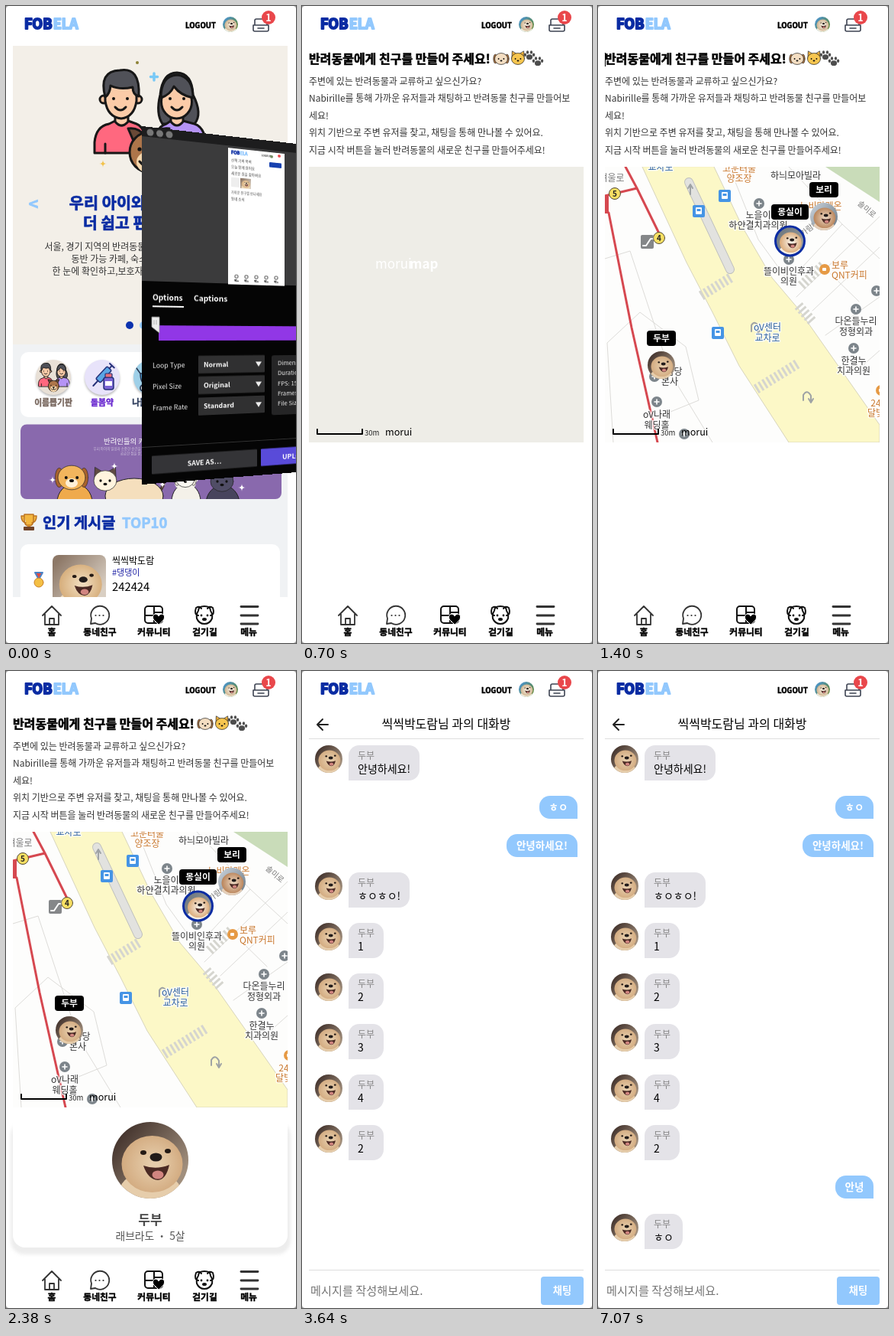
Recreate the animation shown at these times as an HTML page with a canvas. Size 380 by 832 pixels, loop 8120 ms.

```html
<!DOCTYPE html>
<html lang="ko">
<head>
<meta charset="utf-8">
<style>
html, body { margin: 0; width: 100%; height: 100%; overflow: hidden; background: #fff; }
canvas { display: block; }
</style>
</head>
<body>
<canvas id="stage" width="380" height="832"></canvas>
<script>
const LOOP = 8120, STEP = 70;
const NAVY = "#0a2ca3", SKY = "#92c8fd", INK = "#111";
const FONT = '"Noto Sans CJK KR", "Noto Sans KR", "Noto Sans CJK JP", "Noto Sans", sans-serif';
const stage = document.getElementById("stage").getContext("2d");
let g = stage;

function paint(path, fill, stroke, width = 1) {
  if (fill) { g.fillStyle = fill; g.fill(path); }
  if (stroke) { g.strokeStyle = stroke; g.lineWidth = width; g.stroke(path); }
}
const shape = (d, fill, stroke, width) => paint(new Path2D(d), fill, stroke, width);
function box(x, y, w, h, r, fill, stroke, width) {
  const p = new Path2D();
  p.roundRect(x, y, w, h, r);
  paint(p, fill, stroke, width);
}
function oval(x, y, rx, ry, fill, stroke, width) {
  const p = new Path2D();
  p.ellipse(x, y, rx, ry, 0, 0, 7);
  paint(p, fill, stroke, width);
}
const dot = (x, y, r, fill, stroke, width) => oval(x, y, r, r, fill, stroke, width);
function text(s, x, y, size, color = "#000", weight = 400, align = "left", heavy = 0) {
  g.font = `${weight} ${size}px ${FONT}`;
  g.textAlign = align;
  g.fillStyle = g.strokeStyle = color;
  if (heavy) { g.lineWidth = heavy; g.strokeText(s, x, y); }
  g.fillText(s, x, y);
}
const display = (s, x, y, size, color, align) => text(s, x, y, size, color, 700, align, size * .035);
function scoped(draw) { g.save(); draw(); g.restore(); }
function clipped(x, y, w, h, r, draw) {
  scoped(() => {
    g.beginPath();
    g.roundRect(x, y, w, h, r);
    g.clip();
    draw();
  });
}
function prerender(w, h, draw) {
  const sheet = new OffscreenCanvas(w, h);
  g = sheet.getContext("2d");
  draw();
  g = stage;
  return sheet;
}
function sparkle(x, y, r, color) {
  shape(`M${x} ${y - r}Q${x} ${y} ${x + r} ${y}Q${x} ${y} ${x} ${y + r}Q${x} ${y} ${x - r} ${y}Q${x} ${y} ${x} ${y - r}`, color);
}
function paw(x, y, r, color) {
  oval(x, y + r * 0.4, r * 0.6, r * 0.5, color);
  for (let i = 0; i < 4; i++) {
    const a = Math.PI * (1.08 + i * 0.28);
    oval(x + Math.cos(a) * r * 0.85, y + Math.sin(a) * r * 0.75 + r * 0.15, r * 0.24, r * 0.32, color);
  }
}
function pawPair(x, y) { paw(x - 5, y - 4, 6.8, "#4d4d4d"); paw(x + 6, y + 4, 6.8, "#4d4d4d"); }

// A simple animal head; pointed ears make it a cat.
function face(x, y, r, fur, ear, cat) {
  for (const side of [-1, 1]) {
    if (cat) shape(`M${x + side * r * .9} ${y - r * 1.15}L${x + side * r * .95} ${y}L${x + side * r * .15} ${y - r * .7}Z`, ear, "#222", .7);
    else oval(x + side * r * .9, y, r * .3, r * .7, ear, "#222", .6);
  }
  oval(x, y, r, r * .88, fur, "#222", .7);
  dot(x - r * .4, y, r * .11, INK);
  dot(x + r * .4, y, r * .11, INK);
  oval(x, y + r * .3, r * .17, r * .12, INK);
}

const PETS = {
  gold: { back: ["#40302a", "#a18f7d"], fur: "#d0a67a", muzzle: "#e6cdab" },
  puppy: { back: ["#8d7867", "#d9cfc3"], fur: "#d3a873", muzzle: "#efdabb" },
  shiba: { back: ["#6d7780", "#9a9b98"], fur: "#d7a069", muzzle: "#f6eee2" },
  brown: { back: ["#c3ccd5", "#7b8893"], fur: "#b3794c", muzzle: "#e6cfb8" },
  field: { back: ["#4c95cf", "#5c8840"], fur: "#c9ab83", muzzle: "#f5eee0" }
};
function petPhoto(x, y, r, kind, corner = r) {
  const pet = PETS[kind];
  clipped(x - r, y - r, 2 * r, 2 * r, corner, () => {
    g.translate(x, y);
    g.scale(r, r);
    const back = g.createLinearGradient(-.8, -.8, .7, .5);
    back.addColorStop(0, pet.back[0]);
    back.addColorStop(1, pet.back[1]);
    g.fillStyle = back;
    g.fillRect(-1, -1, 2, 2);
    const fur = g.createRadialGradient(.12, .1, .1, .05, .1, .9);
    fur.addColorStop(0, pet.muzzle);
    fur.addColorStop(1, pet.fur);
    oval(0, .8, .8, .5, pet.muzzle);
    oval(.05, .1, .8, .74, fur);
    oval(-.18, -.2, .08, .06, "#241a15");
    oval(.46, -.24, .08, .06, "#241a15");
    oval(.15, -.08, .16, .11, "#211b1a");
    shape("M-.18 .14Q.16 .26 .5 .12Q.42 .5 .2 .52Q-.06 .5-.18 .14", "#4b2a24");
    oval(.2, .38, .15, .11, "#d18580");
  });
}

function family() {
  g.lineJoin = g.lineCap = "round";
  const line = (d, fill) => shape(d, fill, "#171717", 3);
  const hair = "#505158", skin = "#fbcba8";
  line("M205 154Q196 140 202 116Q205 87 224 87Q244 88 245 116Q258 141 247 154Z", hair);
  line("M116 192V178Q118 157 135 154L143 150Q151 162 160 150L171 154Q184 159 186 192Z", "#ff687f");
  line("M193 192Q194 158 210 154L216 150Q224 161 232 150L247 154Q263 159 263 192Z", "#b593f5");
  line("M143 140V151Q151 161 160 151V140Z", skin);
  line("M216 140V151Q224 161 232 151V140Z", skin);
  dot(128, 122, 5, "#fbc39d", "#171717", 3);
  dot(173, 122, 5, "#fbc39d", "#171717", 3);
  line("M130 105Q150 94 171 105V124Q168 145 151 147Q133 145 130 124Z", skin);
  line("M130 119Q121 85 149 84Q176 79 174 118Q166 116 166 106Q149 110 137 104Q136 115 130 119Z", hair);
  oval(223.5, 125, 20, 22, skin, "#171717", 3);
  line("M203 120Q203 91 224 90Q245 92 245 120Q229 117 220 105Q215 116 203 120Z", hair);
  for (const x of [150, 224]) {
    dot(x - 9, 121, 2, INK);
    dot(x + 9, 121, 2, INK);
    line(`M${x - 7} 132Q${x} 140 ${x + 7} 132`);
  }
  line("M130 180V192M250 178V192");
  line("M170 183L160 160Q174 158 182 170Z", "#694936");
  line("M204 183L214 160Q200 158 192 170Z", "#694936");
  oval(187, 191, 25, 26, "#ad754a", "#171717", 3);
  oval(187, 204, 16, 14, "#f5d7ad");
  dot(175, 187, 2.6, INK);
  dot(199, 187, 2.6, INK);
  shape("M180 195Q187 192 194 195L187 202Z", INK);
  line("M187 202V206M175 203Q181 211 187 206Q193 211 199 203");
}

function logoWord(x, y, size) {
  text("FOB", x, y, size, NAVY, 700, "left", size / 9);
  const w = g.measureText("FOB").width + size / 14;
  text("ELA", x + w, y, size, SKY, 700, "left", size / 9);
}

function header() {
  logoWord(24, 29.5, 18);
  text("LOGOUT", 235, 28.5, 9.6, "#000", 700, "left", .5);
  petPhoto(294, 24, 10, "field");
  shape("M326 25V19Q326 17 328 17H340Q342 17 342 19V25M324 25H344V31Q344 33 342 33H326Q324 33 324 31ZM330 29H338", null, "#3d4352", 1.6);
  dot(344, 15, 9, "#e9474b");
  text("1", 344, 19.5, 12.5, "#fff", 700, "center");
}

function nav() {
  g.fillStyle = "#fff";
  g.fillRect(4, 772, 372, 56);
  g.lineJoin = g.lineCap = "round";
  shape("M48 796L60 784L72 796M51 794V808H69V794M57 808V800H63V808", null, "#333", 1.8);
  shape("M111 807L112 800A12 12 0 1 1 117 806Z", null, "#333", 1.8);
  for (let i = 0; i < 3; i++) dot(117.5 + i * 5, 796, 1.1, "#333");
  box(182, 784, 23, 22, 4, null, "#111", 2);
  shape("M194 784V806M182 796H194M194 792H205", null, "#111", 2);
  shape("M200 808L193 801Q191 795 196 794Q199 794 200 797Q201 794 205 794Q209 796 207 801Z", "#000", "#fff", 1);
  shape("M252 790Q252 784 260 784Q268 784 268 790Q271 794 270 800Q267 807 260 807Q253 807 250 800Q249 794 252 790M252 796Q246 795 249 786Q254 783 256 787M268 796Q274 795 271 786Q266 783 264 787", null, "#111", 2);
  dot(256, 796, 1.4, INK);
  dot(264, 796, 1.4, INK);
  oval(260, 801, 3, 2, INK);
  for (const y of [784.5, 796, 807]) shape(`M308 ${y}H330`, null, "#333", 2.8);
  const labels = ["홈", "동네친구", "커뮤니티", "걷기길", "메뉴"];
  [60, 123, 194, 260.5, 318].forEach((x, i) => display(labels[i], x, 822, 11.8, "#000", "center"));
}

const categoryArt = [
  () => { g.translate(-52, -42); g.scale(.28, .28); family(); },
  () => {
    g.rotate(.75);
    box(-5, -15, 8, 22, 2, "#5aa5e5", "#27327a", 1.5);
    shape("M-1 7V16M-1-15V-20M-5-20H3", null, "#27327a", 2);
    g.rotate(-.75);
    box(2, 0, 13, 16, 3, "#7b65d4", "#27327a", 1.5);
    box(4, -5, 9, 5, 1, "#e46e79", "#27327a", 1.2);
    box(4, 5, 9, 6, 0, "#fff");
  },
  () => {
    face(2, -8, 6, "#d9924f", "#9b5e30");
    shape("M-14-5H15Q16 8 5 9H-7Q-14 8-14-5", "#499bd0", "#26354f", 1.4);
    shape("M-14-5L-19-12M-7 9L-10 14M5 9L9 14", null, "#26354f", 1.5);
    dot(-10, 14, 4, "#ddd", "#26354f", 1.8);
    dot(9, 14, 4, "#ddd", "#26354f", 1.8);
  },
  () => {
    shape("M0-19Q8-13 16-14Q18 11 0 18Q-18 11-16-14Q-8-13 0-19", "#b5dcea", "#25365e", 3);
    paw(0, -1, 9, "#4a9ccb");
  },
  () => {
    shape("M0-1L-16-9Q-15-21-5-19Q0-18 0-14Q3-22 13-18Q18-10 0-1", "#e65455");
    box(-13, -4, 26, 18, 2, "#f6c64e");
    face(-7, 5, 5, "#fff", "#c9d7e7", true);
    face(7, 6, 5, "#e09a51", "#9f6036");
    box(-12, 12, 24, 5, 2, "#315d9e");
  }
];

function categories() {
  box(19, 452, 340, 85, 10, "#fff");
  const names = ["이름뽑기판", "돌봄약", "나들이쉼터", "별빛배웅", "간식장"];
  const inks = ["#77665d", "#6929cf", "#32405f", "#e6802f", "#29347f"];
  const backs = ["#e8e0d6", "#e8e3fa", "#9fd0e8", "#fbecd3", "#58ace9"];
  names.forEach((name, i) => {
    const x = 62 + i * 64;
    scoped(() => {
      g.shadowColor = "#0004";
      g.shadowBlur = 3;
      g.shadowOffsetY = 2;
      dot(x, 485, 23, backs[i]);
    });
    clipped(x - 23, 462, 46, 46, 23, () => { g.translate(x, 485); categoryArt[i](); });
    display(name, x, 522, 10.8, inks[i], "center");
  });
}

function banner() {
  clipped(19, 546.5, 342, 97.5, 8, () => {
    g.fillStyle = "#8969ad";
    g.fillRect(19, 546, 342, 98);
    text("반려인들의 커뮤니티", 128, 572, 9.4, "#fff", 500);
    text("수다!", 211, 571, 20, "#2450b8", 700, "left", 4);
    text("수다!", 211, 571, 20, "#9bd5ff", 700);
    text("우리 아이의 일상과 소중한 순간을 함께 나누며 서로 이야기를 들려주는 공간입니다", 190, 580, 4.5, "#fff9", 400, "center");
    text("궁금한 점을 묻고 즐거운 소식을 전해 보세요", 190, 586, 4.5, "#fff9", 400, "center");
    oval(90, 648, 23, 24, "#efaa4c", "#222");
    face(86, 616, 18, "#f2b55d", "#a9632e");
    oval(86, 623, 8, 6, "#fff0d6");
    oval(86, 620, 3, 2, INK);
    shape("M196 640Q214 622 202 611Q194 609 195 616", null, "#4b3832", 4);
    oval(168, 640, 38, 23, "#f5dfbd", "#222");
    face(130, 620, 15, "#fff4df", "#604a42", true);
    oval(236, 647, 19, 23, "#f4f1e9", "#222");
    for (let i = 0; i < 8; i++) dot(235 + Math.cos(i * Math.PI / 4) * 11, 617 + Math.sin(i * Math.PI / 4) * 10, 6, "#f4f1e9");
    face(235, 618, 12, "#faf8f1", "#e7e1d7");
    oval(284, 650, 22, 24, "#47445d", "#222");
    face(283, 621, 15, "#504d66", "#3d3a50", true);
    [[61, 619], [142, 601], [205, 625], [257, 604], [309, 629]].forEach(([x, y]) => sparkle(x, y, 5, "#fff"));
  });
}

function home() {
  g.fillStyle = "#f3efe8";
  g.fillRect(9, 52, 360, 390);
  g.fillStyle = "#f0f2f4";
  g.fillRect(9, 442, 360, 330);
  scoped(family);
  shape("M194 88V97M189.500 92.500H198.500", null, "#79c9f6", 3.5);
  dot(172, 74, 2, "#8d8134");
  dot(229, 220, 2, "#f07482");
  sparkle(127, 206, 5, "#f2c34d");
  sparkle(250, 206, 6, "#f2c34d");
  display("<", 36, 267, 22, SKY, "center");
  display(">", 342, 267, 22, SKY, "center");
  display("우리 아이와 함께하는 삶,", 189, 264.5, 20.8, NAVY, "center");
  display("더 쉽고 편리하게!", 175, 291, 20.4, NAVY, "center");
  pawPair(264, 282);
  ["서울, 경기 지역의 반려동물 병원 · 약국 위치 및 정보부터", "동반 가능 카페, 숙소 등 다양한 서비스까지", "한 눈에 확인하고,보호자들과 소통하는 커뮤니티까지"]
    .forEach((s, i) => text(s, 189, 318.5 + i * 16, 12, "#333", 400, "center"));
  for (let i = 0; i < 4; i++) dot(162 + i * 18, 417, 5, i ? SKY : "#0b32ae");
  categories();
  banner();
  shape("M24 664H36V671Q36 679 30 679Q24 679 24 671ZM24 666H20Q20 674 26 675M36 666H40Q40 674 34 675", "#f3b73f", "#bd7524", 1.5);
  box(28, 677, 4, 4, 0, "#d58c2b");
  box(23, 680, 14, 5, 1, "#704329");
  display("인기 게시글", 48, 681.5, 19.8, NAVY);
  display("TOP10", 152, 681.5, 18.5, SKY);
  box(19, 703, 340, 85, 10, "#fff");
  shape("M38 740L43 749L48 740Z", "#df4a43", "#4b83c5", 2);
  dot(43, 753, 6, "#f4bf44", "#ca8129", 1);
  petPhoto(96, 752, 35, "puppy", 8);
  text("씩씩박도람", 139, 728.5, 12);
  text("#댕댕이", 139, 744, 11, "#2326a7");
  text("242424", 139, 764, 14.8);
}

function crosswalk(x, y, angle, count) {
  scoped(() => {
    g.translate(x, y);
    g.rotate(angle);
    for (let i = 0; i < count; i++) box(i * 6, -6, 3, 13, 0, "#d5d5cf");
  });
}

function mapTiles() {
  g.lineJoin = g.lineCap = "round";
  g.fillStyle = "#fdfdfc";
  g.fillRect(9, 210, 360, 360);
  shape("M298 210H369V256Z", "#c9dcb9");
  shape("M9 330L42 320L95 480L150 570M20 570L12 440L55 400L115 445L132 515L95 530M172 210L210 305L250 360L320 285L250 210M260 380L369 275M281 398L369 315M298 430L369 380M335 480L369 450M320 285L369 330M305 350L342 386", null, "#dddcd9", 1);
  shape("M58 210L116 335L150 400L185 470L250 570H369V547L262 395L228 355L190 290L152 210Z", "#fcf8c7", "#d8d5bd", 1);
  shape("M119 230L173 344", null, "#bfc0bd", 12);
  shape("M119 230L173 344", null, "#e2e2df", 10);
  crosswalk(135, 378, -.55, 8);
  crosswalk(207, 500, -.55, 11);
  crosswalk(263, 391, .85, 5);
  crosswalk(266, 365, -.75, 7);
  shape("M36 210L51 238L83 303M9 248L51 238M14 270L44 420L78 570", null, "#d64850", 3);
  box(7, 247, 7, 24, 0, "#d64850");
  [["5", 22, 245], ["4", 80, 303]].forEach(([n, x, y]) => {
    dot(x, y, 7.5, "#f8df63", "#514b38", 1);
    text(n, x, y + 3.5, 10, "#222", 700, "center");
  });
  box(56, 299, 17, 18, 2, "#858789");
  shape("M59 313H63L69 304H71", null, "#fff", 2);
  [[132, 268], [166, 248], [157, 427]].forEach(([x, y]) => {
    box(x - 8, y - 8, 16, 16, 2, "#4594e5");
    box(x - 4, y - 5, 8, 9, 1, "#fff");
    box(x - 2.5, y - 3, 5, 3, 0, "#4594e5");
  });
  [[211, 258], [250, 331], [338, 396], [335, 447], [77, 517], [74, 484], [113, 559], [365, 372]].forEach(([x, y]) => {
    dot(x, y, 7, "#7d858b");
    shape(`M${x - 3} ${y}H${x + 3}M${x} ${y - 3}V${y + 3}`, null, "#fff", 1.6);
  });
  [[297, 344], [371, 502]].forEach(([x, y]) => { dot(x, y, 7, "#e69a45"); box(x - 3, y - 2, 5, 4, 1, "#fff"); });
  shape("M121 246V234M118 238L121 233L124 238M201 425V417Q205 410 210 418V425M207 422L210 427L213 422M269 515V508Q274 500 279 509V516M276 513L279 518L282 513", null, "#9fa3a5", 2);

  const ink = "#333", blue = "#285d9d", orange = "#c8762b";
  const label = (lines, x, y, color = ink, align = "center") =>
    lines.split("/").forEach((s, i) => {
      text(s, x, y + i * 13.5, 12, "#fffc", 400, align, 3);
      text(s, x, y + i * 13.5, 12, color, 400, align);
    });
  label("교차로", 82, 215, blue);
  label("고운터울/양조장", 185, 216.500, orange);
  label("하늬모아빌라", 259, 225.5);
  label("노을이/하얀결치과의원", 210, 277.5);
  label("뜰이비인후과/의원", 250, 350.5);
  label("보루/QNT커피", 306, 342.5, orange, "left");
  label("다온들누리/정형외과", 338, 416);
  label("한결누/치과의원", 335, 467.5);
  label("oV센터/교차로", 222, 424, blue);
  label("다솜당/본사", 94, 481.5);
  label("oV나래/웨딩홀", 77, 538);
  label("누비마켓온", 292, 266, orange);
  label("24/달빛", 364, 522.5, orange);
  label("여울로", 18, 229, "#777");
  [["솔미로", 342, 256, .7], ["가람대로", 266, 298, -.65]].forEach(([s, x, y, a]) => scoped(() => {
    g.translate(x, y);
    g.rotate(a);
    text(s, 0, 4, 10, "#777");
  }));
}
const tiles = prerender(380, 832, mapTiles);

function marker(name, x, y, w, photoY, kind, ring) {
  petPhoto(x, photoY, 18, kind);
  if (ring) dot(x, photoY, 19, null, NAVY, 3);
  box(x - w / 2, y, w, 20, 4, "#000");
  text(name, x, y + 14, 11.8, "#fff", 700, "center");
}

function profileCard() {
  scoped(() => {
    g.filter = "blur(2px)";
    box(6, 589, 367, 173, 18, "#ededed");
  });
  box(9, 575, 360, 178, 16, "#fff");
  petPhoto(189, 639, 50, "gold");
  text("두부", 189, 723, 17, "#4a4a4a", 700, "center");
  text("래브라도 ・ 5살", 189, 743, 13.8, "#555", 400, "center");
}

function mapPage(t) {
  display("반려동물에게 친구를 만들어 주세요!", 9, 75, 16, "#000");
  face(261, 69, 8.5, "#f4dec2", "#a66f3e");
  face(283, 69, 8.5, "#f7c650", "#efad35", true);
  pawPair(303, 68);
  ["주변에 있는 반려동물과 교류하고 싶으신가요?", "Nabirille를 통해 가까운 유저들과 채팅하고 반려동물 친구를 만들어보", "세요!", "위치 기반으로 주변 유저를 찾고, 채팅을 통해 만나볼 수 있어요.", "지금 시작 버튼을 눌러 반려동물의 새로운 친구를 만들어주세요!"]
    .forEach((s, i) => text(s, 9, 103 + i * 22.4, 12, "#333"));
  clipped(9, 210, 360, 360, 0, () => {
    g.fillStyle = "#eeede7";
    g.fillRect(9, 210, 360, 360);
    text("morui", 96, 343, 17, "#fff");
    text("map", 141, 343, 17, "#fff", 700);
    g.globalAlpha = Math.min(1, Math.max(0, (t - 770) / 350));
    g.drawImage(tiles, 0, 0);
    g.globalAlpha = 1;
    shape("M20 553V559H79V553", null, "#000", 2);
    text("30m", 82, 560.5, 9.5, "#222", 500);
    text("morui", 109, 560.5, 12.6, "#000", 500);
    if (t >= 770) {
      marker("보리", 296, 230, 38, 275, "brown");
      marker("몽실이", 251.5, 259, 49, 307, "shiba", true);
      marker("두부", 83, 424, 38, 469, "gold");
    }
  });
  if (t >= 1890) scoped(() => {
    g.globalAlpha = Math.min(1, (t - 1820) / 280);
    profileCard();
  });
  nav();
}

const MESSAGES = [
  { y: 97, w: 93, s: "안녕하세요!" }, { y: 163, w: 50, s: "ㅎㅇ", own: true },
  { y: 213, w: 93, s: "안녕하세요!", own: true }, { y: 263, w: 80, s: "ㅎㅇㅎㅇ!" },
  { y: 329, w: 46, s: "1" }, { y: 395, w: 46, s: "2" }, { y: 461, w: 46, s: "3" },
  { y: 527, w: 46, s: "4" }, { y: 593, w: 46, s: "2" },
  { y: 659, w: 50, s: "안녕", own: true, at: 5040 }, { y: 709, w: 50, s: "ㅎㅇ", at: 7000 }
];
function message({ y, w, s, own }) {
  if (own) {
    box(361 - w, y, w, 30, [14, 14, 0, 14], SKY);
    text(s, 361 - w / 2, y + 20, 13.5, "#fff", 700, "center");
  } else {
    petPhoto(35, y + 18, 18, "gold");
    box(61, y, w, 46, [14, 14, 14, 0], "#e4e3e8");
    text("두부", 73, y + 17.5, 12, "#858585");
    text(s, 73, y + 35.5, 14);
  }
}

const TYPING = [[3920, "ㅇ"], [3990, "아"], [4130, "안"], [4340, "안ㄴ"], [4620, "안녀"], [4760, "안녕"], [4970, ""]];
function chat(t) {
  g.lineCap = g.lineJoin = "round";
  shape("M34 70H20M27 63L20 70L27 77", null, "#222", 2);
  text("씩씩박도람님 과의 대화방", 189, 75, 16, "#000", 400, "center");
  g.fillStyle = "#dedede";
  g.fillRect(9, 88, 360, 1);
  g.fillRect(9, 782, 360, 1);
  MESSAGES.filter(m => t >= (m.at || 2520)).forEach(message);
  const typed = TYPING.reduce((s, [at, value]) => t >= at ? value : s, "");
  text(typed || "메시지를 작성해보세요.", 11, 814.5, 15.2, typed ? "#000" : "#757575");
  if (typed) caret(11 + Math.round(g.measureText(typed).width), 801, 17);
  box(313, 791, 56, 37, 4, SKY);
  text("채팅", 341, 814, 13.2, "#fff", 700, "center");
}

function caret(x, y, h) {
  g.fillStyle = "#000";
  g.fillRect(x, y, 1, h);
}
const CARETS = [
  [350, 700, 114, 72, 173], [1400, 1890, 9, 61, 18], [2450, 2940, 19, 62, 19],
  [3080, 3640, 11, 801, 17], [5040, 5530, 11, 801, 17], [6020, 6230, 11, 801, 17]
];

function editorFace() {
  box(0, 0, 202, 468, 0, "#050505");
  box(0, 0, 202, 13, 0, "#1d1d1e");
  box(0, 13, 202, 189, 0, "#3b3b3c");
  for (let i = 0; i < 3; i++) dot(11 + i * 12.5, 7, 4.5, "#777");
  box(113, 16, 74, 187, 0, "#fff");
  logoWord(117, 24, 5.5);
  text("LOGOUT", 157, 23, 3, "#222", 700);
  dot(170, 22, 2, "#718b60");
  dot(180, 20, 2, "#e9474b");
  box(167, 30, 16, 7, 1, "#1741b0");
  ["산책 기록 목록", "오늘 함께 걸어요", "새로운 길을 찾아봐요"].forEach((s, i) => text(s, 117, 34 + i * 9, 4.5, "#444"));
  box(117, 56, 11, 13, 1, "#eee");
  petPhoto(136, 63, 7, "puppy", 1);
  text("가까운 친구를 만나세요", 117, 78, 4.2, "#444");
  text("동네 소식", 117, 87, 4.5, "#333");
  for (let i = 0; i < 5; i++) {
    box(122 + i * 13, 190, 4, 4, 1, null, "#222", .8);
    text("메뉴", 124 + i * 13, 199, 3.4, "#111", 700, "center");
  }
  text("Options", 14, 227, 10.2, "#fff", 700);
  text("Captions", 68, 227, 10.2, "#fff", 700);
  box(14, 234, 41, 2, 0, "#fff");
  box(22, 260, 180, 20, 0, "#9137e6");
  shape("M13 249H23V270L13 262Z", "#eee", "#999", .8);
  shape("M16 253V259M19 253V259", null, "#999", .7);
  [["Loop Type", "Normal", 300.5], ["Pixel Size", "Original", 328.5], ["Frame Rate", "Standard", 357]].forEach(([name, value, y]) => {
    text(name, 14, y + 15, 8.8, "#eee", 500);
    box(74, y, 87, 24, 1, "#303031");
    text(value, 81, y + 15, 8.8, "#fff", 700);
    shape(`M149 ${y + 9}H157L153 ${y + 16}Z`, "#eee");
  });
  box(170, 301, 40, 84, 3, "#252526");
  ["Dimensions", "Duration", "FPS: 15", "Frames", "File Size"].forEach((s, i) => text(s, 178, 315 + i * 14.3, 7.7, "#eee", 500));
  box(0, 419, 202, 1, 0, "#333");
  box(13, 431.5, 138, 24, 1, "#343437");
  text("SAVE AS…", 82, 447.5, 8.8, "#fff", 700, "center");
  box(156, 431.5, 50, 24, 1, "#594bd9");
  text("UPLOAD", 184, 447.5, 8.8, "#fff", 700);
}
const editor = prerender(202, 468, editorFace);

function turningWindow(t) {
  const turn = t / 210;
  const left = Math.round(178 + 202 * turn), span = 380 - left;
  for (let x = 0; x < span; x++) {
    const p = x / span;
    const top = 157 + 23 * p - 14 * turn, bottom = 625 - 16 * p + 14 * turn;
    g.drawImage(editor, p * 202, 0, Math.min(202 / span, 202 - p * 202), 468, left + x, top, 1, bottom - top);
  }
}

function frame() {
  const t = Math.floor(performance.now() % LOOP / STEP) * STEP;
  g.fillStyle = "#999";
  g.fillRect(0, 0, 380, 832);
  box(0, 0, 380, 832, 4, "#fff");
  header();
  if (t < 700) { home(); nav(); }
  else if (t < 2450) mapPage(t);
  else chat(t);
  if (t < 210) turningWindow(t);
  for (const [from, to, ...line] of CARETS) if (t >= from && t < to) caret(...line);
  requestAnimationFrame(frame);
}
frame();
</script>
</body>
</html>
```
